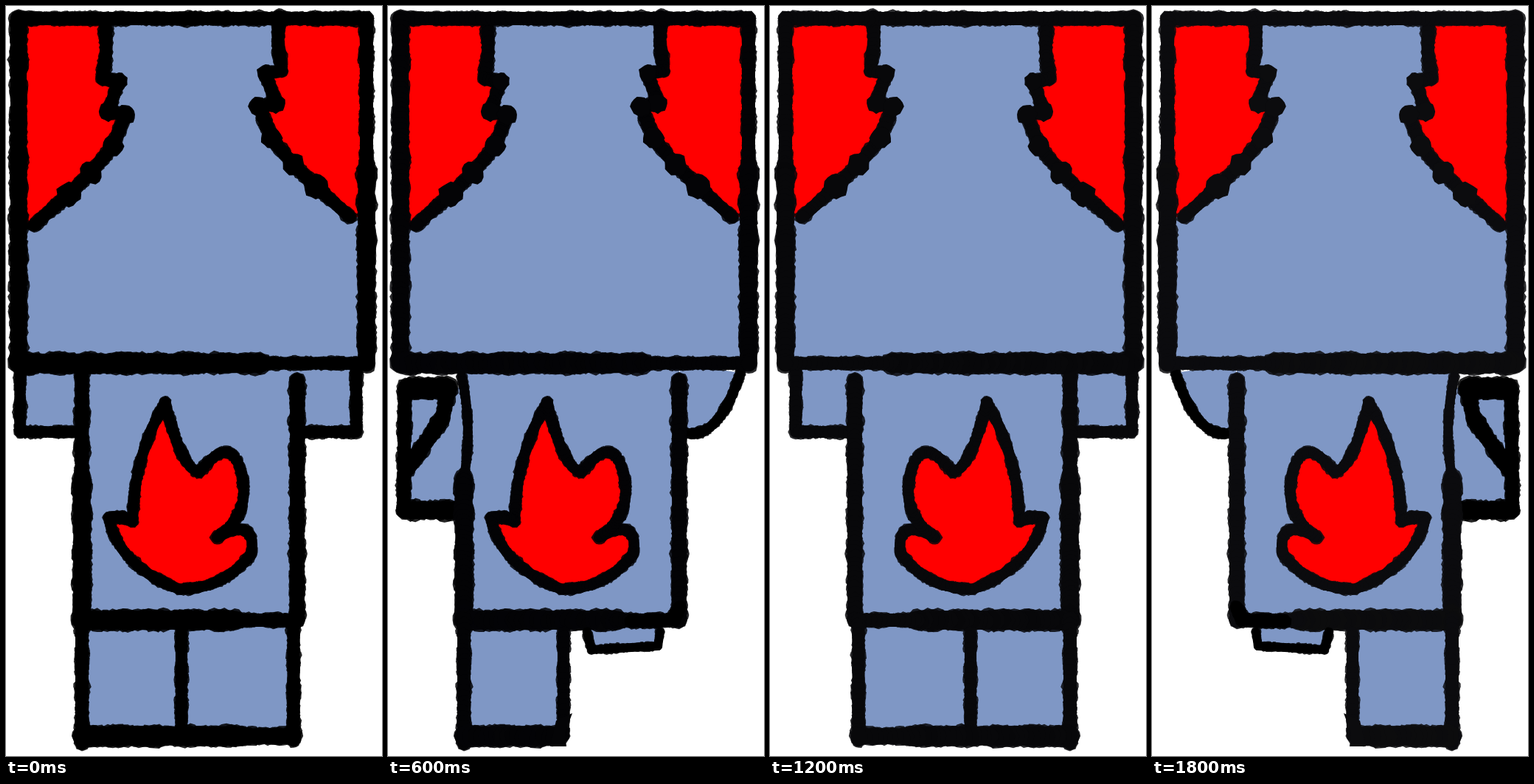
Recreate the animation shown at these times as an HTML page with a canvas. Size 510 by 1016 pixels, loop 2400 ms.

```html
<!DOCTYPE html>
<html>
<head>
<meta charset="utf-8">
<style>
html, body { margin: 0; width: 100%; height: 100%; overflow: hidden; background: #fff; }
canvas { display: block; }
</style>
</head>
<body>
<canvas id="stage" width="510" height="1016"></canvas>
<script>
const WIDTH = 510, HEIGHT = 1016, HOLD = 600;
const BLUE = '#7f97c5', RED = '#ff0000', BLACK = '#000';
const ctx = document.getElementById('stage').getContext('2d');
let ink = BLACK;

const HEAD = { left: 17, right: 489, top: 17, bottom: 484 };
const BODY = { left: 103, right: 395, waist: 832, middle: 238, foot: 989 };

function seeded(seed) {
  return () => {
    seed = (seed * 1664525 + 1013904223) % 4294967296;
    return seed / 4294967296;
  };
}

function trace(points) {
  ctx.beginPath();
  for (const [x, y] of points) ctx.lineTo(x, y);
}

function area(color, points) {
  ctx.fillStyle = color;
  trace(points);
  ctx.fill();
}

function block(left, top, right, bottom) {
  ctx.fillStyle = BLUE;
  ctx.fillRect(left, top, right - left, bottom - top);
}

// Starts at the first point; each later pair is a control point and an end.
function curve([start, ...rest]) {
  const points = [start];
  let [x, y] = start;
  for (let i = 0; i < rest.length; i += 2) {
    const [[cx, cy], [ex, ey]] = [rest[i], rest[i + 1]];
    for (let t = 0.1; t < 1.05; t += 0.1) {
      const a = (1 - t) ** 2, b = 2 * t * (1 - t), c = t * t;
      points.push([a * x + b * cx + c * ex, a * y + b * cy + c * ey]);
    }
    [x, y] = [ex, ey];
  }
  return points;
}

function dab(x, y, radius, random) {
  const points = Array.from({ length: 16 }, (_, k) => {
    const angle = k * Math.PI / 8, r = radius * (0.9 + 0.2 * random());
    return [x + r * Math.cos(angle), y + r * Math.sin(angle)];
  });
  area(ink, points);
}

// A ragged line: a solid core with dabs that swell and shrink like beads.
function brush(width, points, color = ink) {
  const random = seeded(Math.round(points[0][0] * 31 + points[0][1] * 17 + width));
  const bead = Math.min(0.12, 1.6 / width);
  const previousInk = ink;
  let walked = 0;
  ink = color;
  ctx.strokeStyle = ink;
  ctx.lineWidth = width * 0.85;
  ctx.lineCap = ctx.lineJoin = 'round';
  trace(points);
  ctx.stroke();
  ctx.globalAlpha = 0.85;
  for (let i = 1; i < points.length; i++) {
    const [[x, y], [ex, ey]] = [points[i - 1], points[i]];
    const length = Math.hypot(ex - x, ey - y);
    const steps = Math.ceil(length / 7);
    for (let s = 0; s < steps; s++) {
      const t = s / steps;
      const swell = bead * Math.sin((walked + t * length) / 7) + 0.16 * (random() - 0.5);
      dab(x + (ex - x) * t, y + (ey - y) * t, width / 2 * (1 + swell), random);
    }
    walked += length;
  }
  dab(...points[points.length - 1], width / 2, random);
  ctx.globalAlpha = 1;
  ink = previousInk;
}

const across = (y, from, to, width) => brush(width, [[from, y], [to, y]]);
const down = (x, from, to, width) => brush(width, [[x, from], [x, to]]);

function drawHair() {
  const lock = [[135, 25], [136, 62], [131, 99], [153, 102], [139, 143], [162, 147],
    [145, 190], [115, 226], [85, 255], [38, 297]];
  const rightLock = lock.map(([x, y]) => [505 - x, y - 11]);
  area(RED, [[HEAD.left, HEAD.top], ...lock, [HEAD.left, 297]]);
  area(RED, [[HEAD.right, HEAD.top], ...rightLock, [HEAD.right, 286]]);
  for (const side of [lock, rightLock]) {
    const random = seeded(5);
    brush(20, side);
    side.slice(3, 9).forEach(([x, y], i) => dab(x, y, 12 + i * 0.9, random));
  }
}

function drawHead() {
  const { left, right, top, bottom } = HEAD;
  block(left, top, right, bottom);
  drawHair();
  across(top, left, right, 21);
  down(left, top, bottom, 26);
  down(right, top, 220, 21);
  down(right, 220, bottom, 27);
  across(bottom, left, 345, 30);
  across(bottom, 345, right, 20);
}

function drawFlame() {
  const outline = curve([[216, 537], [172, 612], [172, 699], [160, 690], [139, 693],
    [153, 759], [235, 790], [296, 790], [333, 742], [340, 690], [286, 720],
    [332, 690], [320, 635], [306, 575], [262, 632], [237, 625], [216, 537]]);
  area(RED, outline);
  brush(17, outline);
}

function drawTorso() {
  const { left, right, waist, middle, foot } = BODY;
  down(right, 507, waist, 23);
  down(left, 640, waist, 27);
  across(waist, left, 310, 30);
  across(waist, 310, right, 21);
  down(left, waist, foot + 10, 21);
  down(middle, 850, foot, 19);
  drawFlame();
}

function drawStanding() {
  const { left, right, waist, foot } = BODY;
  const hand = 577;
  block(19, HEAD.bottom, 475, hand);
  block(left, HEAD.bottom, right, waist);
  block(left, waist, 390, foot);
  brush(18, [[19, 490], [19, hand], [left, hand]]);
  brush(19, [[475, 490], [475, hand], [right, hand]]);
  down(left, 500, 640, 22);
  drawTorso();
  down(390, waist, foot + 6, 20);
  across(foot, left, 320, 30);
  across(foot, 320, 390, 25);
}

function drawStepping() {
  const { left, right, waist, middle, foot } = BODY;
  const farArm = curve([[478, 497], [448, 590], [402, 578]]);
  const farFoot = [[270, 848], [276, 872], [366, 867], [369, 848]];
  block(left, HEAD.bottom, right, waist);
  block(left, waist, middle, foot);
  block(23, 517, left, 683);
  area(BLUE, [...farArm, [right, HEAD.bottom]]);
  area(BLUE, [[270, waist], ...farFoot, [369, waist]]);

  brush(16, farArm, BLACK);
  brush(32, [[29, 518], [80, 518]], BLACK);
  brush(21, [[23, 515], [21, 683]], BLACK);
  brush(28, [[24, 683], [left, 683]], BLACK);
  brush(24, [[82, 518], [74, 558], [26, 628]], BLACK);
  brush(15, curve([[100, 502], [115, 570], [left, 640]]));
  drawTorso();
  brush(20, [[right, 815], [386, waist], [330, waist + 2]], BLACK);
  brush(14, farFoot, BLACK);
  across(foot, left, 228, 30);
  area(ink, [[228, 968], [250, 958], [240, 985], [242, 1003], [220, 1003]]);
}

function drawPose(pose) {
  const mirrored = pose > 1, shade = pose * 4;
  ink = `rgb(${shade}, ${shade}, ${shade + Math.sign(pose) * 2})`;
  ctx.setTransform(1, 0, 0, 1, 0, 0);
  ctx.fillStyle = '#fff';
  ctx.fillRect(0, 0, WIDTH, HEIGHT);
  if (mirrored) ctx.setTransform(-1, 0, 0, 1, WIDTH, 0);
  if (pose % 2) drawStepping();
  else drawStanding();
  drawHead();
}

let shown = -1;
function tick() {
  const pose = Math.floor(performance.now() / HOLD) % 4;
  if (pose !== shown) drawPose(shown = pose);
  requestAnimationFrame(tick);
}
tick();
</script>
</body>
</html>
```
